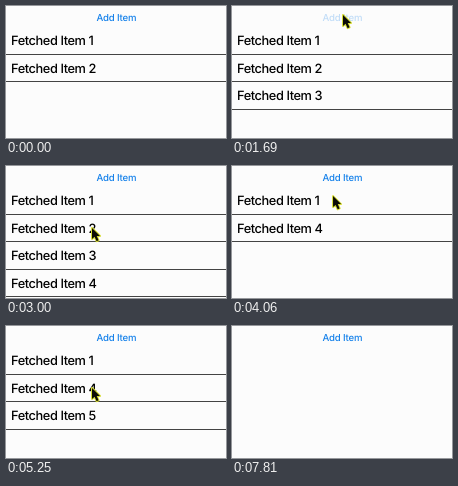
Animation, 220 px wide and 132 px high, one loop 7.87 s. Source, as an HTML page:

```html
<!DOCTYPE html>
<html lang="en">
<head>
<meta charset="utf-8">
<title>Item list</title>
<style>
  html, body { margin: 0; width: 100%; height: 100%; overflow: hidden; background: #fcfcfc; }
  svg { display: block; width: 220px; height: 132px; }
  text { font-family: Inter, "Liberation Sans", sans-serif; font-weight: 500; text-rendering: geometricPrecision; }
  #add { font-size: 9.6px; letter-spacing: -0.2px; fill: #1480ea; }
  .row text { font-size: 12.8px; letter-spacing: -0.42px; fill: #000; }
  .row rect { fill: #444; shape-rendering: crispEdges; }
</style>
</head>
<body>
<svg viewBox="0 0 220 132">
  <rect width="220" height="132" fill="#fcfcfc"/>
  <text id="add" x="110.4" y="14.8" text-anchor="middle">Add Item</text>
  <g id="rows"></g>
  <path id="cursor" d="M0 0V11L2.6 8.8L4.6 13.2L6.6 12.3L4.7 8H8Z"
    fill="#0c0c06" stroke="#d8de34" stroke-width="2" stroke-linejoin="round" paint-order="stroke"/>
</svg>
<script>
const LOOP = 7870, ROW = 27.4, PRESS = 60, FADE = 270;
const $ = id => document.getElementById(id);
const ease = p => p * p * (3 - 2 * p);

// Each click adds an item or removes the one in a row
const ADD = -1;
const clicks = [
  { at: 1690, on: ADD }, { at: 2190, on: ADD },
  { at: 3250, on: 1 }, { at: 3750, on: 1 },
  { at: 4560, on: ADD },
  { at: 5440, on: 1 }, { at: 5870, on: 1 }, { at: 6690, on: 0 }
];

// Pointer journeys between a few places
const place = { off: [2, -17], add: [111, 9], second: [86, 62], below: [68, 60], first: [66, 43], left: [-14, 34] };
const moves = [
  { from: 690, to: 1380, goal: "add" },
  { from: 2400, to: 3000, goal: "second" },
  { from: 3720, to: 4320, goal: "add" },
  { from: 4680, to: 5250, goal: "second" },
  { from: 5920, to: 6440, goal: "below" },
  { from: 6440, to: 6640, goal: "first" },
  { from: 6700, to: 7130, goal: "left" }
];

const rows = [0, 1, 2, 3].map(i => {
  const g = document.createElementNS("http://www.w3.org/2000/svg", "g");
  g.setAttribute("class", "row");
  g.innerHTML = `<text x="5" y="${39.3 + i * ROW}"></text>
    <rect y="${Math.round(48 + i * ROW)}" width="220" height="1"/>`;
  $("rows").append(g);
  return g;
});

function itemsAt(t) {
  const items = [1, 2];
  let next = 3;
  for (const c of clicks) {
    if (c.at > t) break;
    if (c.on === ADD) items.push(next++);
    else items.splice(c.on, 1);
  }
  return items;
}

function pointerAt(t) {
  let [x, y] = place.off;
  for (const m of moves) {
    if (t < m.from) break;
    const p = ease(Math.min(1, (t - m.from) / (m.to - m.from)));
    const [gx, gy] = place[m.goal];
    x += (gx - x) * p;
    y += (gy - y) * p;
  }
  return [x, y];
}

// Dims on press; the button then recovers after release
function opacityAt(t, on) {
  for (const c of clicks) {
    const d = t - c.at;
    if (c.on !== on || d < -PRESS) continue;
    if (d < 0) return 0.3;
    if (on === ADD && d < FADE) return 0.25 + 0.75 * ease(d / FADE);
  }
  return 1;
}

function draw(t) {
  const items = itemsAt(t);
  rows.forEach((g, i) => {
    const label = g.querySelector("text");
    g.style.display = i < items.length ? "" : "none";
    label.textContent = "Fetched Item " + items[i];
    label.style.opacity = opacityAt(t, i);
  });
  $("add").style.opacity = opacityAt(t, ADD);
  $("cursor").setAttribute("transform", `translate(${pointerAt(t)})`);
}

const start = performance.now();
function tick() {
  draw((performance.now() - start) % LOOP);
  requestAnimationFrame(tick);
}
draw(0);
requestAnimationFrame(tick);
</script>
</body>
</html>
```
